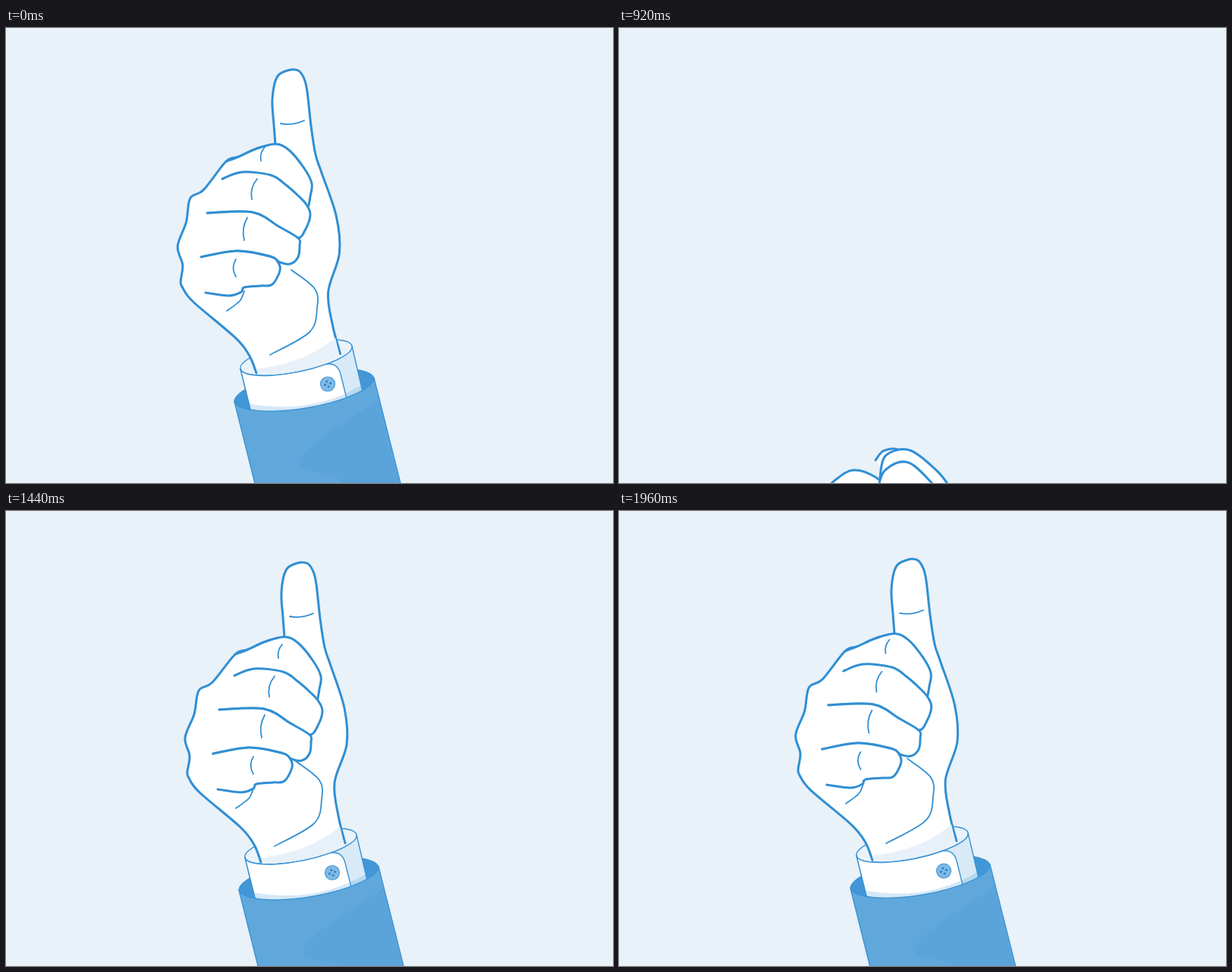
An HTML page with a canvas that plays this animation: 800 px wide and 600 px high, repeating every 2 s.

```html
<!DOCTYPE html>
<html lang="en">
<head>
<meta charset="utf-8">
<title>Thumbs up</title>
<style>
html, body { margin: 0; width: 100%; height: 100%; overflow: hidden; background: #e9f1f9; }
canvas { display: block; width: 800px; height: 600px; }
</style>
</head>
<body>
<canvas id="stage" width="800" height="600"></canvas>
<script>
const ctx = document.getElementById('stage').getContext('2d');
const BG = '#e9f1f9', LINE = '#308fd3', EDGE = '#3b93d4';
const LOOP = 2000, STEP = 40, GONE = 240, BACK = 920;
const PIVOT = [333, 138];

const mix = (a, b, k) => a + (b - a) * k;
const clamp = v => Math.max(0, Math.min(1, v));
const parse = s => s.split(/[\s,]+/).map(Number);

// A shape that turns from the open hand into the fist; shift is its move in a tight squeeze.
const morph = (open, fist, shift, bunch = [0, 0]) =>
  ({ open: parse(open), fist: parse(fist), shift, bunch });

const palm = morph(
  '337,491 332,460 303,425 266,385 249,359 240,340 235,320 234,303 256,262 274,212 290,188 ' +
  '320,183 350,192 380,198 390,213 418,235 433,244 433,244 436,228 439,195 450,160 466,131 ' +
  '486,120 497,127 496,139 489,170 483,210 484,240 487,310 484,357 470,389 473,430 479,468',
  '336,463 327,440 309,417 255,371 241,352 239,344 242,323 236,299 248,268 254,237 272,226 ' +
  '302,189 318,183 345,171 367,166 367,166 367,166 367,166 365,140 363,107 369,78 383,69 ' +
  '397,69 405,80 409,97 414,142 420,180 428,204 446,260 449,308 433,358 438,402 447,438');

const index = morph(
  '310,163 314,147 332,137 360,146 384,156 400,168 401,182 394,193 381,198',
  '302,189 318,183 340,173 367,166 385,174 405,198 415,218 413,235 411,247', [-12, -13]);

const middle = morph(
  '272,213 265,183 290,162 335,170 360,182 380,197 386,212 380,230 362,234 340,227 310,216 280,208',
  '301,217 327,208 365,212 385,225 402,240 412,251 417,264 411,283 400,295 375,280 340,261 281,262',
  [-16, -18], [54, -31]);

const ring = morph(
  '256,272 251,240 275,216 330,232 380,248 393,264 384,279 365,282 340,275 308,270 290,270',
  '281,262 340,261 375,280 400,295 402,305 400,320 390,329 376,327 363,319 320,312 273,320',
  [-15, -18], [76, -70]);

const little = morph(
  '236,300 242,277 278,270 322,276 345,288 341,303 320,309 290,313 267,315 272,320 253,338',
  '273,320 320,312 363,319 374,326 377,338 367,356 352,358 330,360 326,366 310,371 279,367',
  [-16, -18], [76, -70]);

const fold = morph('316,311 298,345 272,372', '326,366 320,379 303,392', [-12, -19]);

const heel = morph('378,352 400,367 412,405 402,442 353,466',
  '382,330 413,355 416,380 406,412 354,442', [-6, -11]);

const nail = new Path2D('M374,139Q390,142 405,135');
const knuckles = new Path2D('M364,176Q357,184 359,194M354,218Q344,230 347,245' +
  'M341,269Q333,283 337,299M326,324Q319,335 326,347');

const rim = 'M315,457A75,19 -11.5 0 ';
const cuffBase = ' 400,525 329,514Z';
const sleeveIn = new Path2D('M307,500A93.5,26 -9.6 0 1 491,469A93.5,26 -9.6 0 1 307,500Z');
const sleeveOut = new Path2D('M307,500A93.5,26 -9.6 0 0 491,469L675,1200H482Z');
const sleeveFold = new Path2D('M497,497C450,530 395,560 392,580S440,585 450,610H526Z');
const cuffIn = new Path2D(rim + '1 462,427A75,19 -11.5 0 1 315,457Z');
const cuffOut = new Path2D(rim + '0 462,427L476,487 470,510' + cuffBase);
const cuffFlap = new Path2D(rim + '0 428.6,450.7Q443,449 447,464L456,500' + cuffBase);
const cuffShade = new Path2D('M326,503Q410,518 475,478L477,495' + cuffBase);
const wristShade = new Path2D('M336,457Q400,450 440,416L445,437 400,470 338,464Z');

// Each track is a row of time:value pairs.
const track = s => s.split(' ').map(p => p.split(':').map(Number));
const tracks = {
  fist: track('0:1 40:1 80:.6 120:.1 160:0 1200:0 1240:.15 1280:.5 1320:.86 1360:1 2000:1'),
  squeeze: track('0:1 40:1 80:.3 120:0 1680:0 1840:.06 1960:.33 2000:1'),
  x: track('0:0 80:10 120:42 160:50 200:40 920:37 1000:54 1040:45 1120:14 1200:0 1440:0 1680:-4 1960:0 2000:0'),
  y: track('0:0 40:-2 80:10 120:60 160:220 200:390 920:420 960:260 1000:110 1040:35 ' +
    '1120:-15 1200:0 1240:0 1360:-12 1440:0 1680:5 1840:3 1960:0 2000:0'),
  angle: track('0:0 80:1 120:6 160:16 200:25 920:27 1000:12 1040:7 1200:0 2000:0'),
  bunch: track('0:0 80:0 120:.2 200:.9 920:1 1000:.5 1120:.1 1200:0 2000:0'),
  stretch: track('0:1 1440:1 1680:1.013 1960:1 2000:1')
};

function valueAt(keys, t) {
  const i = Math.max(1, keys.findIndex(k => k[0] >= t));
  const [[t0, v0], [t1, v1]] = [keys[i - 1], keys[i]];
  return mix(v0, v1, (t - t0) / (t1 - t0));
}

// Smooth curve through the points; a doubled point makes a corner.
function curve(pts) {
  const path = new Path2D();
  path.moveTo(...pts[0]);
  for (let i = 0; i < pts.length - 1; i++) {
    const b = pts[i], c = pts[i + 1];
    const a = pts[i - 1] || b, d = pts[i + 2] || c;
    if (b[0] === c[0] && b[1] === c[1]) continue;
    path.bezierCurveTo(
      b[0] + (c[0] - a[0]) / 6, b[1] + (c[1] - a[1]) / 6,
      c[0] - (d[0] - b[0]) / 6, c[1] - (d[1] - b[1]) / 6, ...c);
  }
  return path;
}

function paint(path, fill, stroke, width) {
  if (fill) {
    ctx.fillStyle = fill;
    ctx.fill(path);
  }
  if (stroke) {
    ctx.strokeStyle = stroke;
    ctx.lineWidth = width;
    ctx.stroke(path);
  }
}

function drawMorph(m, s, fill, width) {
  const pts = [];
  for (let i = 0; i < m.fist.length; i += 2) {
    const [x, y] = [m.fist[i], m.fist[i + 1]];
    const up = clamp((457 - y) / 250);
    const [dx, dy] = m.shift || [-6 - 6 * up, -8 - 5 * up];
    pts.push([
      mix(m.open[i], x + dx * s.squeeze, s.fist) + m.bunch[0] * s.bunch,
      mix(m.open[i + 1], y + dy * s.squeeze, s.fist) + m.bunch[1] * s.bunch
    ]);
  }
  paint(curve(pts), fill, LINE, width);
}

// The arm comes closer while the hand is open.
function onArm(s, paintArm) {
  const k = 1 - s.fist;
  ctx.save();
  ctx.transform(mix(1, 1.227, k), .0727 * k, -.0508 * k, mix(1, 1.223, k), -49.3 * k, -100.8 * k);
  ctx.translate(-6 * s.squeeze, -7.5 * s.squeeze);
  paintArm();
  ctx.restore();
}

function drawCrease(path, s, dx, dy) {
  ctx.save();
  ctx.globalAlpha = clamp((s.fist - .6) / .4);
  ctx.translate(dx * s.squeeze, dy * s.squeeze);
  paint(path, null, LINE, 1.8);
  ctx.restore();
}

function disc(x, y, r) {
  const path = new Path2D();
  path.arc(x, y, r, 0, 2 * Math.PI);
  return path;
}

function drawButton() {
  paint(disc(430, 477, 9.5), '#80bae7', '#4b9bd8', 1.2);
  for (let i = 0; i < 4; i++) {
    const a = 1.25 + i * Math.PI / 2;
    paint(disc(430 + 3.7 * Math.cos(a), 477 + 3.7 * Math.sin(a), 1.6), '#2f84c8');
  }
}

function drawHand(s) {
  onArm(s, () => {
    paint(sleeveIn, '#4397d7', EDGE, 1.4);
    paint(cuffIn, '#eaf3fa', EDGE, 1.4);
  });
  drawMorph(palm, s, '#fff', 3);
  onArm(s, () => paint(wristShade, '#e8f1f9'));
  for (const finger of [index, middle, ring, little]) drawMorph(finger, s, '#fff', 3);
  drawCrease(nail, s, -12, -13);
  drawCrease(knuckles, s, -23, -19);
  drawMorph(fold, s, null, 1.8);
  drawMorph(heel, s, null, 1.8);
  onArm(s, () => {
    paint(cuffOut, '#d8eaf7', EDGE, 1.4);
    paint(cuffFlap, '#fff', EDGE, 1.4);
    paint(cuffShade, 'rgba(75,157,219,.24)');
    drawButton();
    paint(sleeveOut, '#60a8dc', EDGE, 1.4);
    paint(sleeveFold, '#5ba4db');
  });
}

function draw(t) {
  ctx.setTransform(1, 0, 0, 1, 0, 0);
  ctx.fillStyle = BG;
  ctx.fillRect(0, 0, 800, 600);
  if (t >= GONE && t < BACK) return;

  const s = {};
  for (const name in tracks) s[name] = valueAt(tracks[name], t);
  ctx.translate(PIVOT[0] + s.x, PIVOT[1] + s.y);
  ctx.rotate(s.angle * Math.PI / 180);
  ctx.scale(1, s.stretch);
  ctx.translate(-PIVOT[0], -PIVOT[1]);
  ctx.lineCap = ctx.lineJoin = 'round';
  drawHand(s);
}

const start = performance.now();
function tick() {
  const t = (performance.now() - start) % LOOP;
  draw(Math.floor(t / STEP) * STEP);
  requestAnimationFrame(tick);
}
tick();
</script>
</body>
</html>
```
